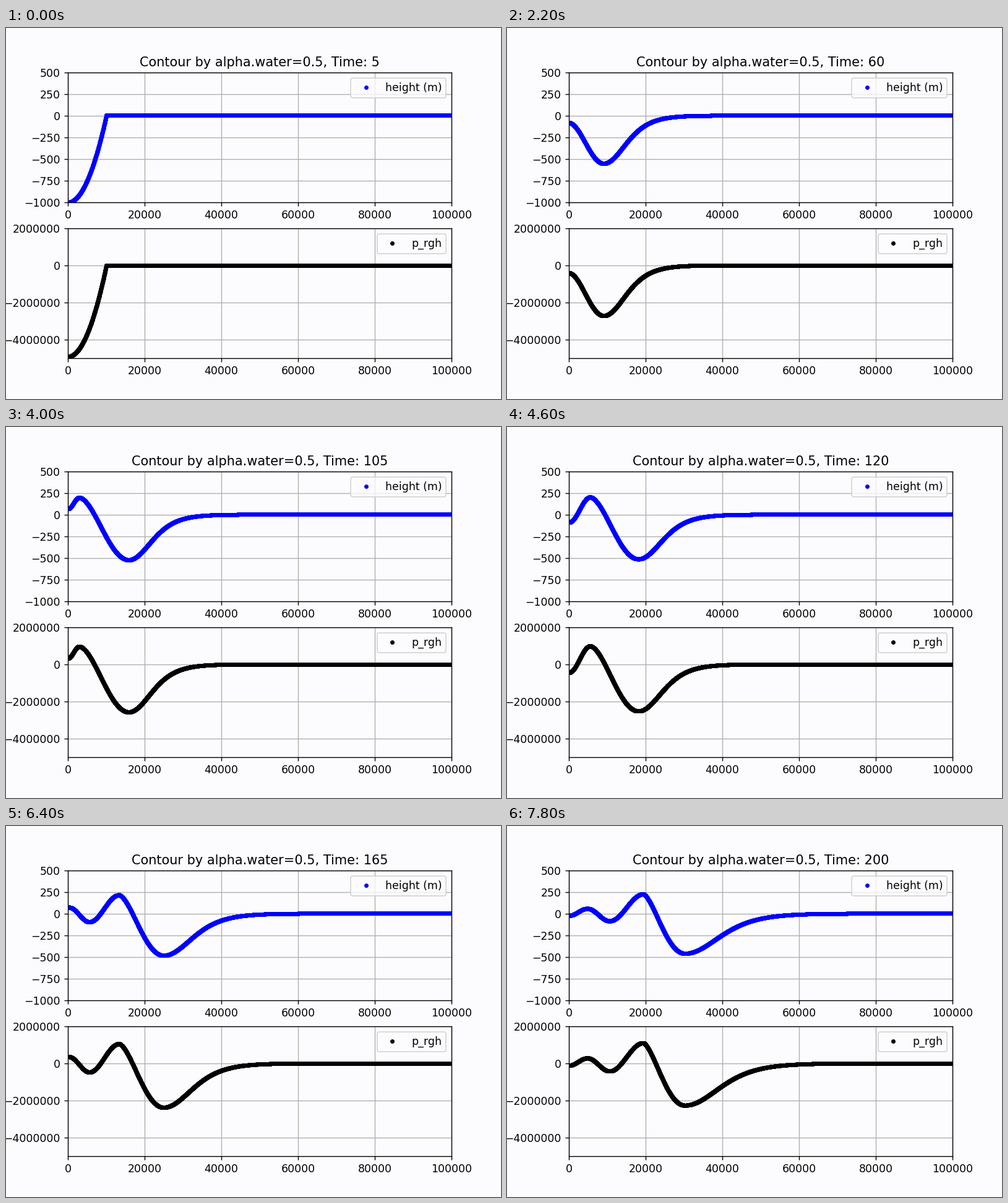
Animation, 800 px wide and 600 px high, one loop 8 s. Source, as a matplotlib script:

```python
import numpy as np
import matplotlib.pyplot as plt
from matplotlib.animation import FuncAnimation

FRAMES, STEP_MS = 40, 200
PAPER = "#fcfcfe"
CALM = 5            # height of still water, m
CRATER = 10         # radius of the first crater, km
DEPTH = 1000        # depth of the first crater, m

# Crests and troughs that leave the centre one after another:
# birth time, height, height change per second, speed in km/s.
WAVES = [(88, 195, .3, .173), (126, -105, .3, .143),
         (163, 76, -.4, .13), (200, -20, 0, 0)]

plt.rcParams.update({
    "font.family": "DejaVu Sans",
    "figure.facecolor": PAPER,
    "axes.facecolor": PAPER,
})


def swing(q, xs, ys, skew=1):
    """Join points by half cosines; skew bends the last stretch."""
    xs, ys = np.array(xs, float), np.array(ys, float)
    i = np.clip(np.searchsorted(xs, q, side="right") - 1, 0, len(xs) - 2)
    s = np.clip((q - xs[i]) / (xs[i + 1] - xs[i]), 0, 1)
    s = s ** np.where(i == len(xs) - 2, skew, 1)
    return ys[i] + (ys[i + 1] - ys[i]) * (1 - np.cos(np.pi * s)) / 2


def centre(t):
    births = [0] + [w[0] for w in WAVES]
    heights = [-DEPTH] + [w[1] for w in WAVES]
    return float(swing(t, births, heights))


def wave_train(x, t):
    """Inner waves up to the leading trough, then a soft outer slope."""
    nodes = [(0, centre(t))]
    for birth, high, change, speed in reversed(WAVES):
        age = t - birth
        if age > 0:
            nodes.append((speed * age, high + change * age))
    trough, low = .151 * t, -590 + .66 * t
    nodes.append((trough, low))
    inner = swing(x, *zip(*nodes), skew=1 - t / 900)

    half = 8 + .115 * t + .00024 * t * t - trough
    s = np.maximum(x - trough, 0) / half
    outer = CALM + (low - CALM) / np.cosh(.8814 * s) ** 2
    return np.where(x < trough, inner, outer)


def height(x, t):
    crater = np.minimum(CALM, DEPTH * ((x / CRATER) ** 2 - 1))
    mix = min(1, (t - 5) / 35)
    return crater + (wave_train(x, t) - crater) * mix


def panel(ax, color, label, ylim, yticks):
    line, = ax.plot([], [], ".", color=color, label=label)
    ax.set_xlim(0, 100000)
    ax.set_ylim(*ylim)
    ax.set_yticks(yticks)
    ax.ticklabel_format(style="plain", useOffset=False)
    ax.grid(True)
    ax.legend(loc="upper right")
    return line


fig, (top, low_ax) = plt.subplots(2, 1, figsize=(6.4, 4.8), dpi=125)
fig.subplots_adjust(left=.125, right=.9, bottom=.11, top=.88, hspace=.2)
level = panel(top, "blue", "height (m)", (-1000, 500),
              range(-1000, 501, 250))
press = panel(low_ax, "black", "p_rgh", (-5e6, 2e6),
              range(-4000000, 2000001, 2000000))
title = top.set_title("")
dist = np.linspace(0, 100, 4001)


def draw(i):
    t = 5 * (i + 1)
    h = height(dist, t)
    level.set_data(dist * 1000, h)
    press.set_data(dist * 1000, 4905 * (h - 2))
    title.set_text(f"Contour by alpha.water=0.5, Time: {t}")
    return level, press, title


anim = FuncAnimation(fig, draw, frames=FRAMES, init_func=lambda: draw(0),
                     interval=STEP_MS, repeat=True, repeat_delay=0)
plt.show()
```
